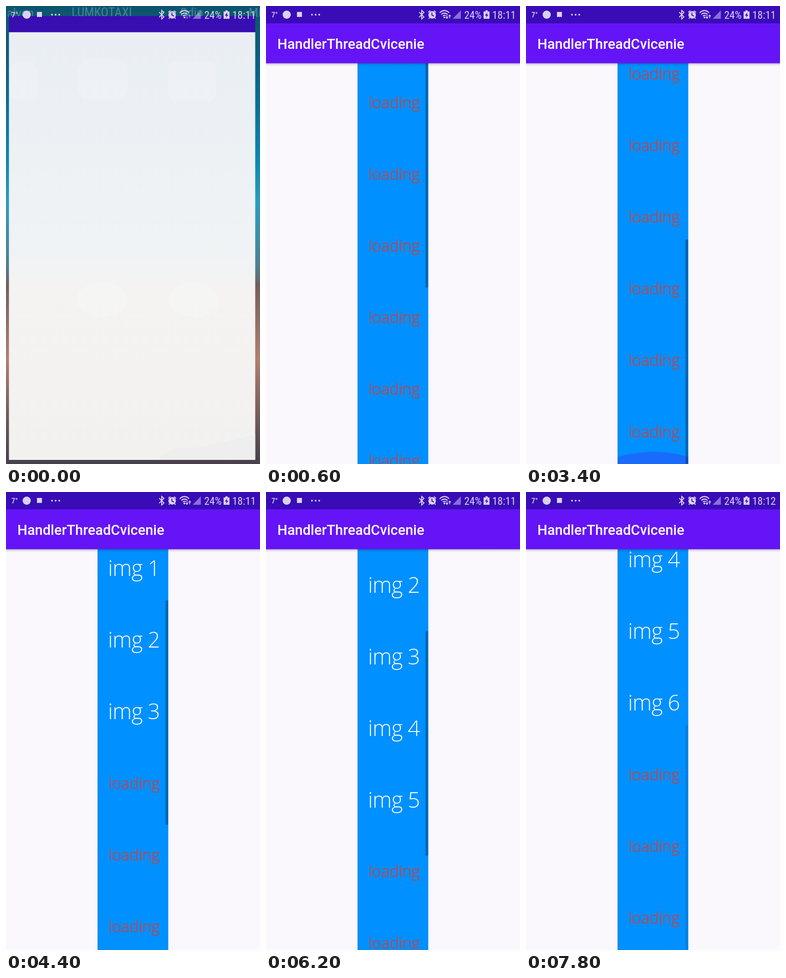
These frames come from a looping animation (558x1004 px, 8000 ms). An HTML page:

```html
<!DOCTYPE html>
<html lang="en">
<head>
<meta charset="utf-8">
<title>Loading list</title>
<style>
html, body { margin: 0; width: 100%; height: 100%; overflow: hidden; background: #faf8fc; }
svg { display: block; }
text { white-space: pre; }
.ui { font-family: Roboto, sans-serif; }
.narrow { font-family: "Roboto Condensed", Roboto, sans-serif; font-stretch: 75%; }
.row { font-family: "Open Sans", sans-serif; font-weight: 300; }
.wait { font-size: 35px; fill: #c0444a; stroke: #c0444a; stroke-width: .5px; letter-spacing: -.35px; }
.done { font-size: 48px; fill: #fff; letter-spacing: -.9px; }
</style>
</head>
<body>
<svg id="stage" width="558" height="1004" viewBox="0 0 558 1004">
  <defs>
    <linearGradient id="wall" x2="0" y2="1">
      <stop offset="0" stop-color="#0d546d"/>
      <stop offset=".15" stop-color="#0b6487"/>
      <stop offset=".33" stop-color="#0d86b0"/>
      <stop offset=".43" stop-color="#2b9dbc"/>
      <stop offset=".57" stop-color="#507f90"/>
      <stop offset=".61" stop-color="#735f5e"/>
      <stop offset=".77" stop-color="#b08070"/>
      <stop offset=".9" stop-color="#705a5b"/>
      <stop offset="1" stop-color="#47404c"/>
    </linearGradient>
    <linearGradient id="sheet" x2="0" y2="1">
      <stop offset="0" stop-color="#e9eef3"/>
      <stop offset=".5" stop-color="#eff3f5"/>
      <stop offset=".6" stop-color="#f4f3f2"/>
      <stop offset="1" stop-color="#f2f1f0"/>
    </linearGradient>
    <linearGradient id="shade" x2="0" y2="1">
      <stop offset="0" stop-color="#000" stop-opacity=".26"/>
      <stop offset=".4" stop-color="#000" stop-opacity=".09"/>
      <stop offset="1" stop-color="#000" stop-opacity="0"/>
    </linearGradient>
  </defs>

  <g id="app">
    <rect width="558" height="1004" fill="#faf8fc"/>
    <g id="content">
      <rect x="201" y="125" width="1" height="879" fill="#4a86ad"/>
      <svg x="202" y="125" width="154.5" height="879" overflow="hidden">
        <rect width="155" height="879" fill="#0090ff"/>
        <g id="rows"></g>
        <path id="glow" fill="#6200ee" fill-opacity=".26"/>
        <rect id="bar" x="148.500" width="6" height="492"/>
      </svg>
      <rect y="38" width="558" height="87.5" fill="#6414f6"/>
      <rect y="125.5" width="558" height="7" fill="url(#shade)"/>
      <rect id="veil" y="38" width="558" height="966" fill="#fff" opacity=".3"/>
      <text class="ui" x="25" y="93.5" font-size="30.8" font-weight="500" fill="#fff">HandlerThreadCvicenie</text>
    </g>
    <rect width="558" height="38" fill="#390cb8"/>
  </g>

  <g id="home">
    <rect width="558" height="1004" fill="url(#wall)"/>
    <g class="narrow" font-size="28" fill="#7fb0c4" fill-opacity=".5">
      <text x="2" y="25">alvon</text>
      <text x="144" y="23">LUMKOTAXI</text>
      <text x="382" y="24">Odjo</text>
      <text x="533" y="24">Mi</text>
    </g>
    <rect x="6.5" y="22" width="541" height="36" fill="#380eb2"/>
    <rect x="6.5" y="57.5" width="541" height="937.5" fill="url(#sheet)"/>
    <g fill="#fff" fill-opacity=".12">
      <rect x="7" y="122" width="62" height="86" rx="22"/>
      <rect x="156" y="116" width="112" height="92" rx="30"/>
      <rect x="356" y="122" width="106" height="86" rx="14"/>
      <ellipse cx="211" cy="644" rx="56" ry="38"/>
      <ellipse cx="412" cy="644" rx="56" ry="38"/>
    </g>
    <path d="M335 995Q350 965 420 968L548 940V995Z" fill="#e9e8ea" fill-opacity=".4"/>
  </g>

  <g id="status" fill="#d9d1f1">
    <text class="narrow" x="12" y="25" font-size="16" font-weight="500">7°</text>
    <circle cx="45.500" cy="19" r="9"/>
    <rect x="68" y="13" width="11" height="11"/>
    <circle cx="101" cy="19" r="1.9"/><circle cx="109" cy="19" r="1.9"/><circle cx="117" cy="19" r="1.9"/>
    <path d="M336.500 13.500L347 24L342 28.500V9.500L347 14L336.500 24.500" fill="none" stroke="#d9d1f1" stroke-width="2"/>
    <circle cx="365" cy="19.500" r="8.300"/>
    <path d="M364.500 14.500V20L369 22" fill="none" stroke="#390cb8" stroke-width="2"/>
    <g fill="none" stroke="#d9d1f1">
      <path d="M356.500 14L361 10M373.500 14L369 10M359.500 25.500L357.500 28M370.500 25.500L372.500 28" stroke-width="2"/>
      <path d="M381.500 15Q392 5 402.500 15M385 18.500Q392 12.500 399 18.500M388.500 22Q392 19 395 21.500" stroke-width="2.200"/>
      <path id="arrows" d="M397.500 20V27M395 24.500L397.500 27L400 24.500M403.500 27V20M401 22.500L403.500 20L406 22.500" stroke-width="1.700"/>
    </g>
    <circle cx="392" cy="25" r="2"/>
    <path d="M428 9.500V28H410Z" fill-opacity=".5"/>
    <text class="narrow" x="435.500" y="27.500" font-size="23.500">24%</text>
    <path d="M482 9.500H487V12H491V28H478V12H482Z"/>
    <path d="M486 14L481 21H484.500L483 26L488.500 19H485Z" fill="#390cb8"/>
    <text id="clock" class="narrow" x="497" y="27.500" font-size="23.500"></text>
  </g>
</svg>
<script>
const LOOP = 8000, STEP = 200, COUNT = 10, PITCH = 157, VIEW = 879, WIDTH = 155;
const END = COUNT * PITCH - VIEW;
const $ = id => document.getElementById(id);

// each swipe moves the list and rebinds the first `ready` images
const SWIPES = [
  { start: -1, stop: 1600, from: 0, to: 0, ready: 0 },
  { start: 2800, stop: 3400, from: 0, to: END, ready: 0 },
  { start: 4000, stop: 5000, from: END, to: 66, ready: 4 },
  { start: 5800, stop: 6600, from: 66, to: 358, ready: 6 },
  { start: 7000, stop: 7400, from: 358, to: END, ready: 7 }
];

const rows = Array.from({ length: COUNT }, () => {
  const el = document.createElementNS("http://www.w3.org/2000/svg", "text");
  return $("rows").appendChild(el);
});

const clamp = x => Math.min(1, Math.max(0, x));
const easeOut = p => 1 - (1 - p) ** 3;

function glowPath(h) {
  if (!h) return "";
  const r = WIDTH * 1.5, ry = r * h / 31, side = VIEW - h * .6;
  return `M0 ${VIEW}V${side}A${r} ${ry} 0 0 1 ${WIDTH} ${side}V${VIEW}Z`;
}

function show(id, on) {
  $(id).style.display = on ? "" : "none";
}

function drawList(t) {
  const { start, stop, from, to, ready } = SWIPES.findLast(s => s.start < t);
  const scroll = from + (to - from) * easeOut(clamp((t - start) / (stop - start)));
  const rest = t - stop;
  const hit = to === END && rest >= 0;
  rows.forEach((el, i) => {
    const done = i < ready;
    el.setAttribute("class", done ? "row done" : "row wait");
    el.setAttribute("x", done ? 22 : 23);
    el.setAttribute("y", i * PITCH + (done ? 103 : 98.5) - scroll);
    el.textContent = done ? "img " + i : "loading";
  });
  $("bar").setAttribute("y", scroll * VIEW / (PITCH * COUNT));
  $("bar").setAttribute("opacity", .3 * clamp((500 - rest) / 260));
  $("glow").setAttribute("d", glowPath(hit ? 26 * clamp(1 - rest / 400) ** 2 : 0));
}

function draw(t) {
  show("home", t < 200);
  show("content", t >= 400);
  show("veil", t < 600);
  $("arrows").setAttribute("opacity", t < 600 ? .45 : 1);
  $("clock").textContent = t < 6400 ? "18:11" : "18:12";
  drawList(t);
}

const begin = performance.now();
let last = -1;
function tick() {
  const t = Math.floor((performance.now() - begin) % LOOP / STEP) * STEP;
  if (t !== last) draw(last = t);
  requestAnimationFrame(tick);
}
tick();
</script>
</body>
</html>
```
